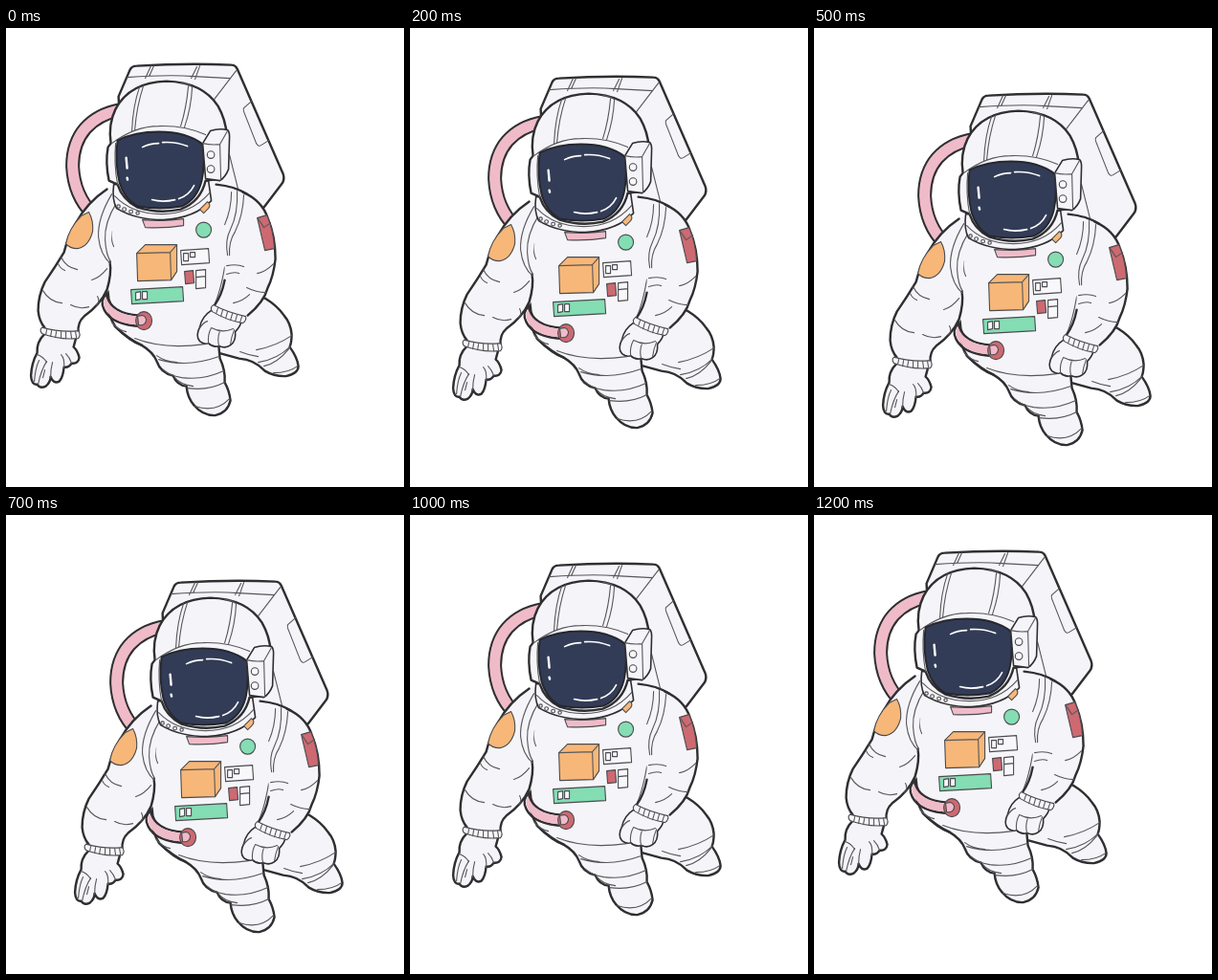
An HTML page that plays this animation: 416x480 px, repeating every 1300 ms.

```html
<!DOCTYPE html>
<html lang="en">
<head>
<meta charset="utf-8">
<title>Floating astronaut</title>
<style>
  html, body { margin: 0; width: 100%; height: 100%; overflow: hidden; background: #fff; }
  svg { display: block; width: 416px; height: 480px; }
  path, circle, ellipse { stroke-linecap: round; stroke-linejoin: round; }
  .bold { fill: #f5f5f9; stroke: #2f2f31; stroke-width: 2.4; }
  .medium { stroke-width: 1.6; }
  .cloth { fill: #f5f5f9; }
  .edge { fill: none; stroke: #2f2f31; stroke-width: 2.4; }
  .thin { fill: none; stroke: #57575b; stroke-width: 1.1; }
  .part { stroke: #4b4b4f; stroke-width: 1.1; }
  .white { fill: #f8f8fb; }
  .pink { fill: #f0bbc9; }
  .orange { fill: #f7b778; }
  .green { fill: #84ddb3; }
  .red { fill: #cd6971; }
  .tube { fill: none; stroke: #2f2f31; stroke-width: 15; }
  .tube.in { stroke: #f0bbc9; stroke-width: 11; }
  .shine { fill: none; stroke: #fff; stroke-width: 1.6; }
</style>
</head>
<body>
<svg viewBox="0.4 0.4 416 480">
<g id="astronaut">
  <!-- backpack -->
  <path class="bold" d="M118 72 L130 44 Q132 40 137 40 Q188 37 236 39 Q240 39 242 43 L290 153 Q292 158 289 163 L270 188 L230 190 L120 110 Z"/>
  <path class="thin" d="M241 45 L218 75 M127 52 Q170 49 197 51 L235 53 M152 40 L146 53 M155 40 L150 51 M200 41 L194 53 M203 40 L198 54
    M257 77 L249 84 Q248 86 249 88 L262 121 Q264 125 267 123 L275 118 M234 133 L243 169"/>

  <!-- air hose -->
  <path class="tube" d="M120 86 C89 92 70 112 70 145 C71 166 78 182 91 195"/>
  <path class="tube in" d="M120 86 C89 92 70 112 70 145 C71 166 78 182 91 195"/>

  <!-- legs -->
  <path class="bold" d="M258 280 L271 283 Q284 291 291 301 Q298 309 299 321 Q299 329 297 334 Q305 345 306 354 Q306 362 293 364.500 Q281 365 271 359 Q260 347 244 346 L222 340 L210 310 Z"/>
  <path class="thin" d="M298 333 Q284 347 264 350 M299 322 Q283 333 262 337 M296 336 Q284 351 270 354 M245 339 Q255 343 264 344 M305 354 Q296 361 280 361"/>
  <path class="bold" d="M114 312 Q130 328 142 332 Q154 339 158 349 Q162 361 175 364 Q179 374 189 375 Q190 387 197 395 Q206 406 219 405.500 Q232 403 235 390 Q234 380 229 371 Q230 359 224 346 L222 325 Z"/>
  <path class="thin" d="M160 347 Q190 356 223 344 M164 357 Q171 364 184 366 Q207 369 228 359 M177 366 Q182 373 196 375 M190 377 Q212 380 229 371 M158 343 Q166 349 179 350 M198 396 Q220 403 234 388"/>

  <!-- torso -->
  <path class="cloth" d="M108 167 Q93 184 89 200 L105 240 Q110 254 106 272 Q105 298 115 314 Q131 327 149 331 Q180 336 225 331 L231 295 L262 280 L275 215 Q268 183 248 175 L228 164 Z"/>
  <path class="edge" d="M106 276 Q105 299 115 313 Q129 326 142 332 M220 164 Q240 166 252 174"/>
  <path class="thin" d="M135 325 Q165 337 208 331 M111 213 Q110 223 113 229 M229 250 Q224 280 216 294 M111 308 Q117 316 126 318"/>

  <!-- waist tube -->
  <path d="M108 274 L105 284 Q108 294 114 298 L109 284 Z" fill="#2f2f31"/>
  <path class="edge" d="M105 279 Q98 285 103 295 Q111 311 143 312.500 M106 279 Q109 299 140 301"/>
  <path class="pink" d="M105 282 Q100 287 105 295 Q113 311 143 311 L141 302 Q111 301 105 282 Z"/>
  <ellipse class="part red" cx="144.500" cy="306.500" rx="8.500" ry="9.500"/>
  <path class="part pink" d="M138 302 Q145 299 147 305 Q147 312 139 311 Z"/>

  <!-- left arm -->
  <path class="cloth" d="M106 169 Q85 183 73 205 Q65 219 61 235 Q52 250 41 266 Q34 280 34 296 Q35 309 42 317 L76 321 Q75 308 82 302 Q99 290 107 274 Q112 257 109 242 L113 190 Z"/>
  <path class="edge" d="M106 169 Q85 183 73 205 Q65 219 61 235 Q52 250 41 266 Q34 280 34 296 Q35 307 41 314 M76 319 Q75 308 82 302 Q99 290 106 274 Q111 257 109 245"/>
  <path class="part orange" d="M87 193 Q92 202 91 213 Q87 229 75 231 Q67 231 63 226 Q66 210 79 197 Z"/>
  <path class="thin" d="M111 174 Q96 199 97 219 Q99 238 110 247 M116 183 Q103 204 104 222 Q105 238 110 245 M58 240 Q63 251 75 253 M55 247 Q57 252 62 254 M39 275 Q46 287 59 288 M90 264 Q99 261 106 252 M68 290 Q77 295 87 292 M96 281 Q99 287 95 290"/>

  <!-- left hand -->
  <path class="bold" d="M41 320 Q32 329 33 340 Q27 351 26.500 364 Q27 374 33 373 Q36 378 42 375 Q47 371 47 365 Q50 373 56 370 Q60 366 61 355 Q66 356 69 351 Q76 352 77 345 Q75 337 71 334 L74 323 Z"/>
  <path class="thin" d="M33 342 Q39 344 43 350 M43 349 Q37 358 34 373 M49 350 Q47 357 47 366 M35 348 Q31 356 30 370 M61 356 Q62 346 58 342 M69 351 Q67 345 63 341 M41 358 L39 366"/>
  <path class="part white medium" d="M38 313.500 Q35 316 38 320 Q56 327 76 325 Q79 321 76 317 Q57 319 38 313.500 Z"/>
  <path class="thin" d="M43 316 L42 321 M48 317 L47 323 M53 318 L52 324 M58 318 L58 324 M63 318 L63 325 M68 318 L69 325 M73 318 L74 324"/>

  <!-- right arm -->
  <path class="cloth" d="M236 168 L248 174 Q268 181 274 199 Q282 218 282 242 Q280 260 274 272 Q270 288 252 303 L217 293 Q227 278 230 258 L225 224 Z"/>
  <path class="edge" d="M248 172 Q268 181 274 199 Q282 218 282 242 Q280 260 274 272 Q270 287 253 301 M218 291 Q226 280 229 264"/>
  <path class="part red" d="M263 199 L273 196 Q280 212 281 231 L271 233 Z"/>
  <path class="thin" d="M264 200 L270 209 L277 204 M242 171 Q243 195 235 211 Q229 223 232 238 M249 175 Q248 197 240 213 Q233 224 234 238 M236 172 Q236 190 229 206 M231 249 Q242 247 249 250 M231 258 Q239 255 244 257 M280 247 Q271 256 263 257 M272 277 Q262 277 252 272 M238 288 Q248 286 255 279"/>

  <!-- right hand -->
  <path class="bold medium" d="M216 295 Q205 302 203 313 Q198 323 203 328 Q208 332 212 330 Q217 335 223 333 Q230 336 235 332 Q241 328 240 318 Q246 312 247 305 Z"/>
  <path class="thin" d="M212 330 Q211 321 215 314 M223 333 Q221 325 224 317 M235 331 Q236 323 239 316 M203 314 Q207 308 211 307 M215 314 Q226 320 238 315"/>
  <path class="part white medium" d="M217 290 Q213 293 216 297 Q231 306 248 309 Q252 306 251 302 Q232 298 217 290 Z"/>
  <path class="thin" d="M222 293 L220 299 M227 295 L225 302 M232 297 L230 304 M237 299 L235 306 M242 300 L240 307 M247 302 L245 308"/>

  <!-- chest -->
  <path class="part pink" d="M143 201 Q165 203 186 200 L186 207 Q167 210 146 209 Z"/>
  <circle class="part green" cx="207" cy="211.500" r="8"/>
  <path class="part orange" d="M137 236 L146 227 L179 227 L179 255 L173 264 L138 265 Z"/>
  <path class="thin" d="M137 236 L172 235 L179 227 M172 235 L173 264"/>
  <path class="part white" d="M183 233 L212 231 L213 246 L184 248 Z M186 236 L191 236 L191 244 L186 244 Z M193 235 L198 235 L198 240 L193 240 Z"/>
  <path class="part red" d="M187 255 L196 254 L197 267 L188 268 Z"/>
  <path class="part white" d="M199 254 L209 253 L209 272 L199 273 Z M199 261 L209 260"/>
  <path class="part green" d="M131 274 L185 271 L186 286 L132 289 Z"/>
  <path class="part white" d="M136 277 L141 276 L141 284 L136 285 Z M143 276 L148 276 L148 284 L143 284 Z"/>

  <!-- collar -->
  <path class="bold medium" d="M113 164 Q111 180 116 189 Q136 201 165 201 Q198 199 215 181 L212 160 Z"/>
  <path class="thin" d="M114 176 Q132 195 163 195 Q194 195 213 173"/>
  <g class="part white">
    <circle cx="118" cy="187" r="1.700"/><circle cx="124" cy="190" r="1.900"/>
    <circle cx="131" cy="192.500" r="1.900"/><circle cx="138" cy="194" r="1.700"/>
  </g>
  <path class="part orange" d="M203 190 L211 182 Q215 185 212 189 L207 194 Z"/>

  <!-- helmet -->
  <path class="bold" d="M110 121 Q107 101 115 85 Q130 57 168 56 Q206 57 222 82 Q230 96 231 112 L226 158 L209 160 Q204 182 183 190 Q160 195 138 188 Q122 180 117 164 L108 160 Q104 141 107 125 Z"/>
  <path class="thin" d="M115 121 Q113 143 117 164 M111 121 Q135 103 160 103 Q187 102 209 112 M140 62 Q133 82 132 108 M144 61 Q137 82 135 107 M183 58 Q189 58 195 62 Q194 84 187 104 M191 61 Q189 84 183 103"/>
  <path d="M117 118 Q135 109 160 109 Q189 109 206 122 Q209 140 205 160 Q200 180 184 187 Q161 191 138 187 Q124 179 119 162 Q114 140 117 118 Z" fill="#333c56" stroke="#26282f" stroke-width="2"/>
  <path class="shine" d="M143 125 Q151 121 160 121 M164 120 Q178 119 190 124 M153 180 Q164 183 177 180 M181 179 Q192 175 197 165"/>
  <path class="shine" style="stroke-width:2.400" d="M126 136 L127 147 M127 157 L127.500 159"/>

  <!-- ear module -->
  <path class="bold medium" d="M206 121 L214 108 Q223 105 232 107 Q234 109 234 114 L233 148 Q230 156 224 160 L209 158 Z"/>
  <path class="thin" d="M206 121 Q215 123 224 122 L225 159 M224 122 L232 108"/>
  <g class="part white">
    <circle cx="214.500" cy="133" r="3.800"/><circle cx="214.500" cy="148" r="3.800"/>
  </g>
</g>
</svg>
<script>
  const astronaut = document.getElementById("astronaut");
  const LOOP = 1300, STEP = 100, TURN = 6;
  const DRIFT = { x: 55.5, y: 37.5 };

  // Drift out in equal steps on whole pixels, then back along the same line.
  function draw(now) {
    const step = Math.floor((now % LOOP) / STEP);
    const part = (TURN - Math.abs(TURN - step)) / TURN;
    const x = Math.round(DRIFT.x * part), y = Math.round(DRIFT.y * part);
    astronaut.setAttribute("transform", `translate(${x} ${y})`);
  }

  let start;
  function tick(now) {
    start ??= now;
    draw(now - start);
    requestAnimationFrame(tick);
  }
  draw(0);
  requestAnimationFrame(tick);
</script>
</body>
</html>
```
